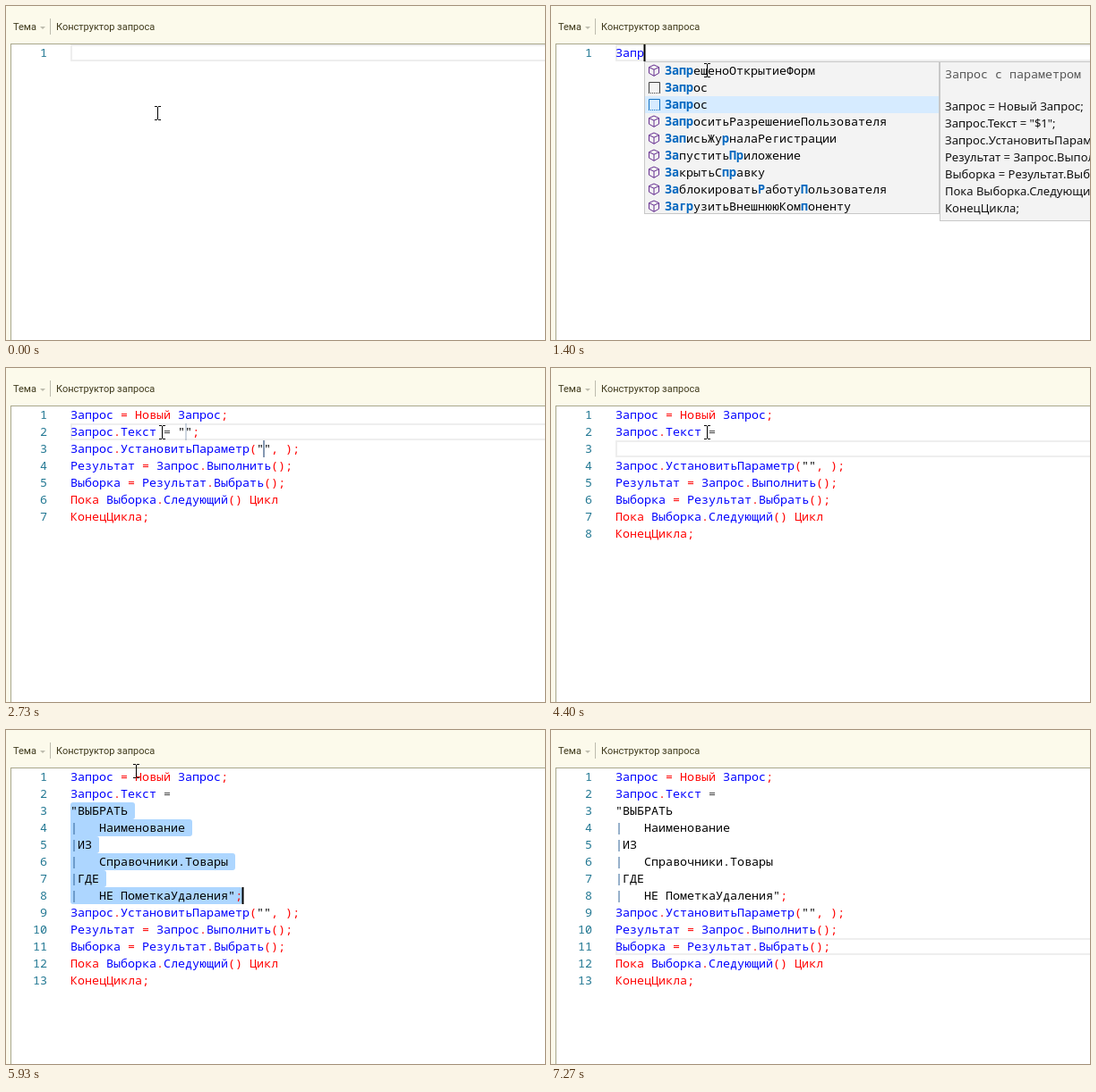
Animation, 602 px wide and 374 px high, one loop 7.67 s. Source, as an HTML page with a canvas:

```html
<!DOCTYPE html>
<html lang="ru">
<head>
<meta charset="utf-8">
<title>Редактор кода</title>
<style>
html, body { margin: 0; width: 100%; height: 100%; overflow: hidden; background: #fcfaeb; }
canvas { display: block; width: 602px; height: 374px; }
</style>
</head>
<body>
<canvas id="stage"></canvas>
<script>
const W = 602, H = 374, LOOP = 7670, STEP = 200 / 3;
const LEFT = 72, TOP = 43, CW = 8, LH = 19;
const MONO = '13.333px "Noto Sans Mono", monospace';
const UI = '11px Roboto, sans-serif';
const BODY = '13px "Noto Sans", sans-serif';
const KEYWORDS = ['Новый', 'Пока', 'Цикл', 'КонецЦикла'];

const canvas = document.getElementById('stage');
const ctx = canvas.getContext('2d');
const dpr = window.devicePixelRatio || 1;
canvas.width = W * dpr;
canvas.height = H * dpr;
ctx.scale(dpr, dpr);

// ---- document states ----
const FIRST = 'Запрос = Новый Запрос;';
const ASSIGN = 'Запрос.Текст = ';
const TAIL = [
  'Запрос.УстановитьПараметр("", );',
  'Результат = Запрос.Выполнить();',
  'Выборка = Результат.Выбрать();',
  'Пока Выборка.Следующий() Цикл',
  'КонецЦикла;'
];
const QUERY = [
  '"ВЫБРАТЬ', '|   Наименование', '|ИЗ', '|   Справочники.Товары',
  '|ГДЕ', '|   НЕ ПометкаУдаления";'
];
const snippet = (...middle) => [FIRST, ...middle, ...TAIL];
const DOCS = [
  [0, ['']], [1000, ['З']], [1130, ['За']], [1270, ['Зап']], [1400, ['Запр']], [1470, ['Запро']],
  [2270, snippet(ASSIGN + '"";')], [3130, snippet(ASSIGN + '";')],
  [3270, snippet(ASSIGN + ';')], [3600, snippet(ASSIGN)],
  [3870, snippet(ASSIGN, '')], [5470, snippet(ASSIGN, ...QUERY)]
];

// ---- completion lists; brackets mark matched letters ----
const ASK = '[З]апроситьРазрешениеПользователя';
const widen = (n, list) => list.map(s => s[0] === '[' ? s : '[' + s.slice(0, n) + ']' + s.slice(n));
const plain = s => s.replace(/[\[\]]/g, '');
const ASKING = plain(ASK);
const LISTS = [
  { t: 1070, col: 1, sel: 1, bar: true, items: widen(1, ['Запрос', 'Запрос', ASK,
    'ЗапуститьПриложение', 'ЗапуститьСистему', 'ЗафиксироватьТранзакцию', 'ЗначениеВДанныеФормы',
    'ЗначениеВСтрокуВнутр', 'ЗначениеВФайл', 'ЗначениеЗаполнено', 'ЗначениеИзСтрокиВнутр',
    'ЗначениеИзФайла']) },
  { t: 1200, col: 2, sel: 1, bar: true, items: widen(2, ['Запрос', 'Запрос', ASKING,
    'ЗапуститьПриложение', 'ЗапуститьСистему', 'ЗафиксироватьТранзакцию', 'ЗакрытьСправку',
    'ЗаписьЖурналаРегистрации', 'ЗапрещеноОткрытиеФорм', 'ЗавершитьРаботуСистемы',
    'ЗаблокироватьРаботуПользователя', 'ЗагрузитьВнешнююКомпоненту']) },
  { t: 1330, col: 3, sel: 2, items: widen(3, ['ЗапрещеноОткрытиеФорм', 'Запрос', 'Запрос', ASKING,
    'ЗаписьЖурналаРегистрации', 'ЗапуститьПриложение', 'ЗапуститьСистему', '[За]крытьС[п]равку',
    '[За]блокироватьРаботу[П]ользователя', '[За]грузитьВнешнююКом[п]оненту']) },
  { t: 1400, col: 4, sel: 2, items: widen(4, ['ЗапрещеноОткрытиеФорм', 'Запрос', 'Запрос', ASKING,
    '[Зап]исьЖу[р]налаРегистрации', '[За]пустить[Пр]иложение', '[За]крытьС[пр]авку',
    '[За]блокировать[Р]аботу[П]ользователя', '[Заг][р]узитьВнешнююКом[п]оненту']) },
  { t: 1470, col: 5, sel: 1, items: widen(5, ['Запрос', 'Запрос', ASKING,
    '[Запр]ещен[о]ОткрытиеФорм', '[За]пустить[Пр]ил[о]жение']) },
  { t: 2270 }
];
const HELP = [
  'Запрос = Новый Запрос;', 'Запрос.Текст = "$1";', 'Запрос.УстановитьПараметр("$2", $3);',
  'Результат = Запрос.Выполнить();', 'Выборка = Результат.Выбрать();',
  'Пока Выборка.Следующий() Цикл', 'КонецЦикла;'
];

// [from, to, line, column]
const CARETS = [
  [330, 800, 1, 0], [1000, 1130, 1, 1], [1130, 1270, 1, 2], [1270, 1400, 1, 3],
  [1400, 1470, 1, 4], [1470, 1930, 1, 5], [2270, 2730, 2, 16], [2870, 3870, 2, 15],
  [3870, 4400, 3, 0], [4870, 5400, 3, 0], [5470, 6000, 8, 24], [6470, 6600, 8, 24],
  [6600, 7130, 11, 30]
];

// [time, x, y]
const PATH = [
  [0, 169, 120], [333, 167, 72], [400, 167, 72], [533, 174, 72], [4533, 174, 72],
  [4867, 134, 23], [5800, 134, 23], [5933, 145, 46], [6533, 324, 247], [6600, 324, 247],
  [7200, 156, 364]
];

const latest = (list, t, time) => list.filter(e => time(e) <= t).pop();
const within = (t, a, b) => t >= a && t < b;

function rect(x, y, w, h, color) {
  ctx.fillStyle = color;
  ctx.fillRect(x, y, w, h);
}

function frame(x, y, w, h, fill, line) {
  rect(x, y, w, h, line);
  rect(x + 1, y + 1, w - 2, h - 2, fill);
}

function text(s, x, y, font, color) {
  ctx.font = font;
  ctx.fillStyle = color;
  ctx.fillText(s, x, y);
}

function strokePath(color, ...lines) {
  ctx.strokeStyle = color;
  ctx.lineWidth = 1;
  ctx.beginPath();
  for (const line of lines) line.forEach(([x, y], i) => i ? ctx.lineTo(x, y) : ctx.moveTo(x, y));
  ctx.stroke();
}

const lineTop = n => TOP + (n - 1) * LH;

function drawHeader(t) {
  rect(0, 0, W, H, '#fcfaeb');
  rect(5, 42, W, H, '#a9a78c');
  rect(6, 43, W, H, '#fff');
  if (within(t, 4800, 5870)) {
    const down = within(t, 5400, 5600);
    frame(53, 12, 115, 22, down ? '#ece4b4' : '#f6f0cf', '#d8d0a0');
  }
  text('Тема', 8, 27, UI, '#3f3a1c');
  text('Конструктор запроса', 56, 27, UI, '#3f3a1c');
  rect(49, 14, 1, 18, '#bdbcae');
  ctx.beginPath();
  ctx.moveTo(38, 23);
  ctx.lineTo(44, 23);
  ctx.lineTo(41, 26);
  ctx.fill();
}

function tokenColor(token, n, col) {
  if (token[0] === '"') return '#000';
  if (n === 2 && token === '=') return '#444';
  if (/[=.();,]/.test(token) || KEYWORDS.includes(token)) return '#f00';
  return '#00f';
}

function drawCodeLine(s, n) {
  const y = lineTop(n) + 14;
  const put = (part, col, color) => text(part, LEFT + col * CW, y, MONO, color);
  const label = String(n);
  text(label, 46 - label.length * CW, y, MONO, '#237893');
  if (QUERY.includes(s)) {
    const end = s.endsWith(';') ? s.length - 1 : s.length;
    const start = s[0] === '|' ? 1 : 0;
    if (start) put('|', 0, '#2a5f95');
    put(s.slice(start, end), start, '#000');
    put(s.slice(end), end, '#f00');
    return;
  }
  for (const m of s.matchAll(/"+|[А-Яа-я]+|[=.();,]/g)) put(m[0], m.index, tokenColor(m[0], n));
}

function drawSelection() {
  ctx.fillStyle = '#add6ff';
  QUERY.forEach((s, i) => {
    const last = i === QUERY.length - 1;
    const w = (s.length + (last ? 0 : 1)) * CW;
    ctx.beginPath();
    ctx.roundRect(LEFT, lineTop(3 + i), w, LH, [i ? 0 : 3, 3, 3, last ? 3 : 0]);
    ctx.fill();
  });
}

function drawEditor(t) {
  const selected = within(t, 5470, 6600);
  const line = t < 2270 ? 1 : t < 3870 ? 2 : t < 5470 ? 3 : 11;
  if (selected) drawSelection();
  else {
    const y = lineTop(line);
    rect(LEFT, y, W, 2, '#eee');
    rect(LEFT, y + LH - 2, W, 2, '#eee');
    rect(LEFT, y, 2, LH, '#eee');
  }
  latest(DOCS, t, d => d[0])[1].forEach((s, i) => drawCodeLine(s, i + 1));
  if (within(t, 2270, 2870)) {
    rect(200, lineTop(2), 2, LH, 'rgba(10,50,100,.2)');
    rect(287, lineTop(3), 2, LH, 'rgba(10,50,100,.5)');
  }
  const caret = CARETS.find(c => within(t, c[0], c[1]));
  if (caret) rect(LEFT + caret[3] * CW - (caret[3] ? 0.5 : 0), lineTop(caret[2]), 2, LH, '#000');
}

function drawIcon(x, y, isSnippet, active) {
  if (isSnippet) {
    const c = active ? '#1674c4' : '#424242';
    strokePath(c, [[x - 5.5, y + 6], [x - 5.5, y - 5.5], [x + 6.5, y - 5.5], [x + 6.5, y + 6]]);
    for (let i = -6; i <= 6; i += 2) rect(x + i, y + 6, 1, 1, c);
    return;
  }
  const at = points => points.map(([a, b]) => [x + a, y + b]);
  strokePath('#652d90',
    at([[0, -6], [5.5, -3.5], [5.5, 3.2], [0, 6.3], [-5.5, 3.2], [-5.5, -3.5], [0, -6]]),
    at([[-5.5, -3.5], [0, -0.8], [5.5, -3.5]]),
    at([[0, -0.8], [0, 6.3]]));
}

function drawItem(s, x, y, active) {
  drawIcon(x + 11, y + 10, plain(s) === 'Запрос', active);
  let col = 0, hit = false;
  for (const ch of s) {
    if (ch === '[' || ch === ']') { hit = ch === '['; continue; }
    text(ch, x + 23 + col++ * CW, y + 15, hit ? 'bold ' + MONO : MONO, hit ? '#0066bf' : '#000');
  }
}

function drawPopup(t) {
  const list = latest(LISTS, t, l => l.t);
  if (!list || !list.items) return;
  const x = LEFT + list.col * CW, y = 62, h = list.items.length * LH;
  frame(x, y, 330, h, '#f3f3f3', '#c8c8c8');
  list.items.forEach((s, i) => {
    const top = y + i * LH, active = i === list.sel;
    if (active) rect(x + 1, top + 1, 328, LH, '#d6ebff');
    drawItem(s, x, top, active);
  });
  if (list.bar) rect(x + 319, 173, 10, 116, '#c6c6c6');
  frame(x + 330, y, W, 179, '#f3f3f3', '#c8c8c8');
  text('Запрос с параметром', x + 336, 81, MONO, '#555');
  HELP.forEach((s, i) => text(s, x + 336, 117 + i * LH, BODY, '#111'));
}

function drawTooltip(t) {
  if (!within(t, 5200, 5470)) return;
  frame(134, 43, 117, 20, '#fff', '#a8a8a8');
  text('Конструктор запроса', 138, 57, UI, '#555');
}

function pointerAt(t) {
  const q = Math.floor((t + 5) / STEP) * STEP;
  const i = PATH.findIndex(p => p[0] > q);
  if (i < 0) return PATH[PATH.length - 1].slice(1);
  const [t0, x0, y0] = PATH[i - 1], [t1, x1, y1] = PATH[i];
  let k = (q - t0) / (t1 - t0);
  if (t1 - t0 > 500) k = k * k * (3 - 2 * k);
  return [Math.round(x0 + (x1 - x0) * k), Math.round(y0 + (y1 - y0) * k)];
}

function drawPointer(t) {
  if (t >= 7270) return;
  const [x, y] = pointerAt(t);
  if (y < 38) {
    const shape = [[0, 0], [0, 16], [4, 12.5], [6.5, 18], [9, 17], [6.5, 11.5], [11.5, 11.5]];
    ctx.beginPath();
    shape.forEach(([a, b]) => ctx.lineTo(x + a + 0.5, y + b + 0.5));
    ctx.closePath();
    ctx.fillStyle = '#fff';
    ctx.fill();
    ctx.strokeStyle = '#000';
    ctx.lineWidth = 1;
    ctx.stroke();
    return;
  }
  rect(x, y - 7, 1, 14, '#000');
  for (const end of [y - 8, y + 7]) {
    rect(x - 3, end, 3, 1, '#000');
    rect(x + 1, end, 3, 1, '#000');
  }
}

function draw(t) {
  drawHeader(t);
  drawEditor(t);
  drawPopup(t);
  drawTooltip(t);
  drawPointer(t);
}

const start = performance.now();
function tick() {
  draw((performance.now() - start) % LOOP);
  requestAnimationFrame(tick);
}
draw(0);
requestAnimationFrame(tick);
</script>
</body>
</html>
```
